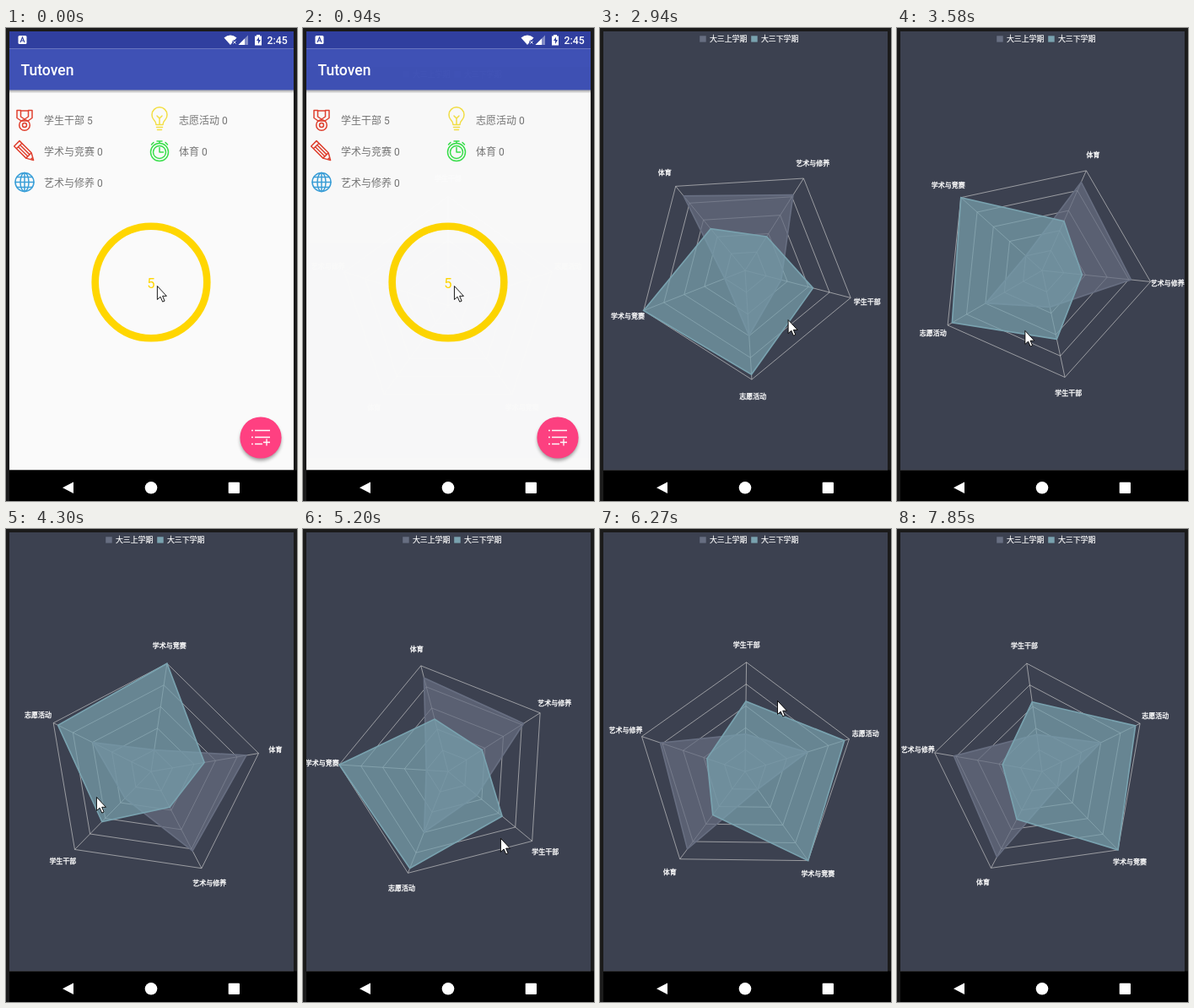
Write an HTML page that moves like this. It is 345 px wide and 560 px high and loops after 8.31 s.

```html
<!DOCTYPE html>
<html lang="zh-CN">
<head>
<meta charset="utf-8">
<style>
html, body { margin: 0; width: 100%; height: 100%; overflow: hidden; background: #1b1b1b; }
svg { display: block; width: 345px; height: 560px; }
text { font-family: Roboto, "Noto Sans CJK SC", "Noto Sans CJK", sans-serif; }
.row { font-size: 12px; fill: #757575; }
.legend { font-size: 8.9px; fill: #fff; stroke: #fff; stroke-width: .2; }
.label { font-size: 8px; fill: #fff; stroke: #fff; stroke-width: .3; text-anchor: middle; }
.icon { fill: none; stroke-width: 1.5; stroke-linejoin: round; stroke-linecap: round; }
</style>
</head>
<body>
<svg viewBox="0 0 345 560">
  <defs>
    <clipPath id="screen"><rect x="4" y="4" width="337" height="519.5"/></clipPath>
    <filter id="soft" x="-30%" y="-30%" width="160%" height="160%"><feGaussianBlur stdDeviation="2"/></filter>
    <linearGradient id="drop" x2="0" y2="1">
      <stop stop-opacity=".32"/><stop offset="1" stop-opacity="0"/>
    </linearGradient>
  </defs>
  <rect width="345" height="560" fill="#1b1b1b"/>

  <g id="home" clip-path="url(#screen)">
    <rect x="4" y="4" width="337" height="520" fill="#fafafa"/>
    <rect x="4" y="4" width="337" height="20.5" fill="#303f9f"/>
    <rect x="4" y="24.5" width="337" height="49" fill="#3f51b5"/>
    <rect x="4" y="73.5" width="337" height="4" fill="url(#drop)"/>
    <text x="17.5" y="56" font-size="17.5" font-weight="500" fill="#fff">Tutoven</text>

    <g fill="#fff">
      <rect x="14.5" y="9" width="10" height="10" rx="1.5"/>
      <path d="M17 17l2.5-6 2.5 6M18 15h3" fill="none" stroke="#303f9f" stroke-width="1.1"/>
      <path d="M258.5 11.5Q266 5.5 273.5 11.5L266 20z"/>
      <path d="M269 15l4 4m0-4l-4 4" stroke="#303f9f" stroke-width="3"/>
      <path d="M269.5 15.5l3 3m0-3l-3 3" stroke="#fff"/>
      <path d="M287 8.5V20H275.5z" opacity=".4"/>
      <path d="M283 12.5V20H275.5z"/>
      <path d="M295 9.5h2V8h4v1.5h2V20.5h-8z"/>
      <path d="M300 10.5l-3 4.5h2v4l3-5h-2z" fill="#303f9f"/>
      <text x="309.5" y="18.7" font-size="12.3" font-weight="500">2:45</text>
    </g>

    <g class="icon" stroke="#e0402f">
      <path d="M13 97.5h4.5v7.5l4.5 3 4.5-3v-7.5H31v9l-5 3.5h-8l-5-3.5zM17.5 98h9"/>
      <circle cx="22" cy="115" r="6.3"/><circle cx="22" cy="115" r="2.5"/>
    </g>
    <g class="icon" stroke="#e0402f" transform="translate(22 146) rotate(45)">
      <path d="M-13-4.5H7L15 0 7 4.5H-13zM-9-4.5v9M7-4.5v9M-9-1.5H7M-9 1.5H7M12-1.5v3"/>
    </g>
    <g class="icon" stroke="#3a9fd8">
      <circle cx="22" cy="182.5" r="11"/><ellipse cx="22" cy="182.5" rx="5" ry="11"/>
      <path d="M22 171.5v22M11 182.5h22M13 176.5h18M13 188.5h18"/>
    </g>
    <g class="icon" stroke="#f3df45">
      <path d="M178 114.5q0-3-2.5-5.5a9 9 0 1 1 13 0q-2.5 2.5-2.5 5.5zM178.5 117.5h7M179.5 120.5h5"/>
      <path d="M182 114v-7l-3-3m3 3l3-3"/>
    </g>
    <g class="icon" stroke="#39df4b">
      <circle cx="182" cy="147" r="10.5"/><circle cx="182" cy="147" r="7.5"/>
      <path d="M182 141.5v5.5h4.5M179 134h6M182 134v2.5M172.5 138l2.5-2.5M191.5 138l-2.5-2.5"/>
    </g>
    <g class="row">
      <text x="45" y="113.5">学生干部 5</text>
      <text x="205" y="113.5">志愿活动 0</text>
      <text x="45" y="150.5">学术与竞赛 0</text>
      <text x="205" y="150.5">体育 0</text>
      <text x="45" y="187.5">艺术与修养 0</text>
    </g>

    <circle cx="172" cy="301" r="66.3" fill="none" stroke="#ffd600" stroke-width="8.6"/>
    <text x="172" y="307.5" font-size="16.5" fill="#ffd600" text-anchor="middle">5</text>

    <circle cx="302" cy="488" r="24" opacity=".4" filter="url(#soft)"/>
    <circle cx="302" cy="485" r="24.6" fill="#ff4081"/>
    <path d="M291 476.5h2m2 0h18M291 484.5h2m2 0h18M291 492.5h2m2 0h9M309 486.5v8m-4-4h8" fill="none" stroke="#fff" stroke-width="1.3"/>
  </g>

  <g clip-path="url(#screen)">
    <g id="chart">
      <rect x="4" y="4" width="337" height="520" fill="#3c4150"/>
      <rect x="118.2" y="9.3" width="7.5" height="7.3" fill="#676e81"/>
      <text class="legend" x="130" y="16.3">大三上学期</text>
      <rect x="179.2" y="9.3" width="7.5" height="7.3" fill="#79a2af"/>
      <text class="legend" x="191" y="16.3">大三下学期</text>
      <path id="web" fill="none" stroke="#ccc" stroke-opacity=".66"/>
      <path id="last" fill="#676e81" stroke="#676e81" fill-opacity=".706" stroke-width="1.65"/>
      <path id="next" fill="#79a2af" stroke="#79a2af" fill-opacity=".706" stroke-width="1.65"/>
      <g id="labels"></g>
    </g>
  </g>

  <rect x="4" y="523.5" width="341" height="36.5"/>
  <g fill="#fff">
    <path d="M67 544.3L80 537.5V551z"/>
    <circle cx="172" cy="544.3" r="7.3"/>
    <rect x="263.7" y="537.7" width="13.3" height="13.3" rx="1"/>
  </g>
  <path id="cursor" d="M.5.5V16.5L4.2 13.2 6.8 19.1 9.2 18.1 6.7 12.3H11.5z" fill="#fff" stroke="#000" stroke-width=".9"/>
</svg>
<script>
const LOOP = 8310, CX = 172, CY = 287.1, R = 129.3;
const names = ['学生干部', '志愿活动', '学术与竞赛', '体育', '艺术与修养'];
const last = [.342, .595, .2, .885, .82];
const next = [.643, .953, 1, .495, .368];

// [time, rotation in degrees]
const spin = [[2380, 0], [2940, 104.3], [3140, 140], [3230, 140], [4060, 206], [4120, 208],
  [4300, 224.4], [4450, 226], [4790, 226], [5200, 129.7], [5550, 85], [5640, 85],
  [6270, .7], [6640, .7], [7220, -7.6], [7370, -8.1]];

// [time, angle, distance] of the pointer around the chart centre
const drag = [[940, 159, 19.2], [1690, 41, 65], [2380, 41, 65], [2940, 138.7, 77], [3140, 173, 75],
  [3230, 173, 75], [4060, 228, 72], [4300, 245.3, 71.6], [4450, 247, 71.5], [4790, 247, 71.5],
  [5200, 141.9, 100], [5550, 106, 145], [5640, 106, 150], [6270, 24.3, 92.4], [6640, 24.3, 92.4],
  [6800, 16, 92], [7140, 62, 178]];

const $ = id => document.getElementById(id);
const clamp = x => Math.min(1, Math.max(0, x));

function sample(keys, t, col) {
  const i = keys.findIndex(k => k[0] > t);
  if (i < 0) return keys[keys.length - 1][col];
  if (!i) return keys[0][col];
  const a = keys[i - 1], b = keys[i];
  return a[col] + (b[col] - a[col]) * (t - a[0]) / (b[0] - a[0]);
}

function polar(deg, r) {
  const a = deg * Math.PI / 180;
  return [CX + r * Math.sin(a), CY - r * Math.cos(a)];
}

const outline = (turn, values, phase = 1) =>
  'M' + values.map((v, i) => polar(turn + 72 * i * phase, R * v * phase).map(n => n.toFixed(2))).join('L') + 'z';

const labels = names.map(name => {
  const el = document.createElementNS('http://www.w3.org/2000/svg', 'text');
  el.textContent = name;
  el.setAttribute('class', 'label');
  return $('labels').appendChild(el);
});

function draw(t) {
  const enter = 1 - (1 - clamp((t - 940) / 260)) ** 2;
  $('chart').setAttribute('opacity', enter);
  $('chart').setAttribute('transform', `translate(0 ${42 * (1 - enter)})`);

  const turn = sample(spin, t, 1);
  const phase = 1 - (1 - clamp((t - 1020) / 1110)) ** 2;
  let web = '';
  for (let ring = 1; ring <= 5; ring++) web += outline(turn, Array(5).fill(ring / 5));
  labels.forEach((el, i) => {
    web += `M${CX} ${CY}L${polar(turn + 72 * i, R)}`;
    const [x, y] = polar(turn + 72 * i, 149.5);
    el.setAttribute('x', x);
    el.setAttribute('y', y + 2.2);
  });
  $('web').setAttribute('d', web);
  $('last').setAttribute('d', outline(turn, last, phase));
  $('next').setAttribute('d', outline(turn, next, phase));

  const [x, y] = polar(sample(drag, t, 1), sample(drag, t, 2));
  $('cursor').setAttribute('transform', `translate(${x} ${y})`);
  $('cursor').setAttribute('visibility', t < 7150 ? 'visible' : 'hidden');
}

const start = performance.now();
function tick() {
  draw((performance.now() - start) % LOOP);
  requestAnimationFrame(tick);
}
tick();
</script>
</body>
</html>
```
